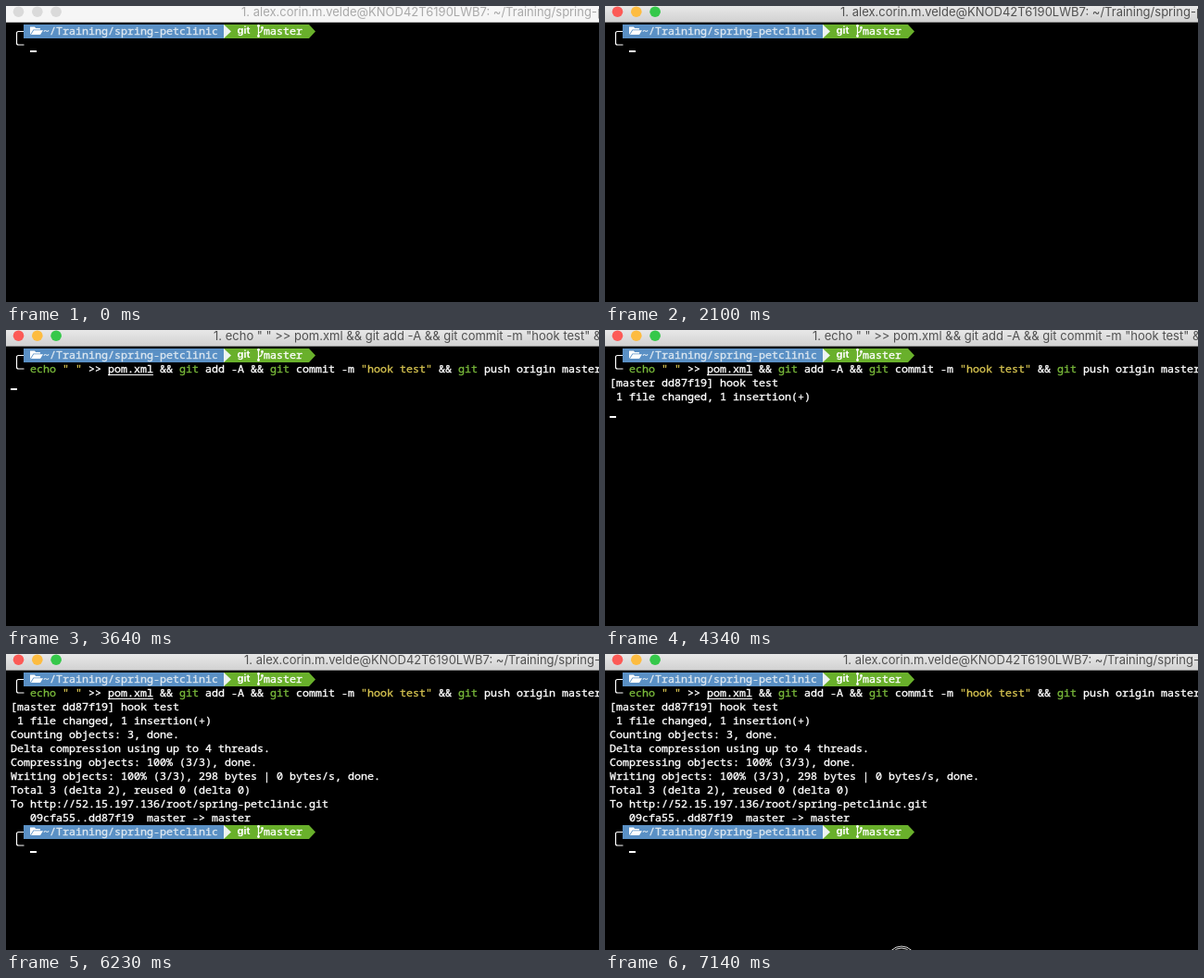
Recreate the animation shown at these times as an HTML page with a canvas. Size 640 px wide and 320 px high, loop 7210 ms.

```html
<!DOCTYPE html>
<html lang="en">
<head>
<meta charset="utf-8">
<title>Terminal push</title>
<style>
  html, body { margin: 0; height: 100%; overflow: hidden; background: #000; }
  canvas { display: block; }
</style>
</head>
<body>
<canvas id="stage" width="640" height="320"></canvas>
<script>
const ctx = document.getElementById('stage').getContext('2d');
const LOOP = 7210, STEP = 70;
const CELL = 7, LINE = 15, LEFT = 5, TOP = 20;
const WHITE = '#fff', GREEN = '#78b83a', YELLOW = '#d6c350';
const BLUE_BG = '#5a90c5', GREEN_BG = '#69b02b';

// Moments when the screen changes, in ms
const AT = {
  press: 1400, focus: 1610, release: 1750, paste: 2450, enter: 3570,
  commit: 3780, count: 4480, write: 4620, total: 4760,
  remote: 6090, prompt: 6230, stop: 7070
};

const command = [
  ['echo', GREEN], [' " "', YELLOW], [' >> pom.xml && ', WHITE],
  ['git', GREEN], [' add -A && ', WHITE], ['git', GREEN],
  [' commit -m ', WHITE], ['"hook test"', YELLOW], [' && ', WHITE],
  ['git', GREEN], [' push origin master', WHITE]
];
const commandText = command.map(part => part[0]).join('');

const output = [
  [AT.commit, '[master dd87f19] hook test'],
  [AT.commit, ' 1 file changed, 1 insertion(+)'],
  [AT.count, 'Counting objects: 3, done.'],
  [AT.count, 'Delta compression using up to 4 threads.'],
  [AT.write, 'Compressing objects: 100% (3/3), done.'],
  [AT.write, 'Writing objects: 100% (3/3), 298 bytes | 0 bytes/s, done.'],
  [AT.total, 'Total 3 (delta 2), reused 0 (delta 0)'],
  [AT.remote, 'To http://52.15.197.136/root/spring-petclinic.git'],
  [AT.remote, '   09cfa55..dd87f19  master -> master']
];

const colX = col => LEFT + col * CELL;
const rowY = row => TOP + row * LINE;

function rect(x, y, w, h, color) {
  ctx.fillStyle = color;
  ctx.fillRect(x, y, w, h);
}

function shape(d, color) {
  ctx.fillStyle = color;
  ctx.fill(new Path2D(d));
}

function line(d, color, width) {
  ctx.strokeStyle = color;
  ctx.lineWidth = width;
  ctx.stroke(new Path2D(d));
}

function circle(x, y, r) {
  ctx.beginPath();
  ctx.arc(x, y, r, 0, 2 * Math.PI);
}

// Monospaced text on the terminal grid, slightly thickened
function print(text, col, row, color = WHITE) {
  ctx.font = '11.667px "Noto Sans Mono", monospace';
  ctx.fillStyle = ctx.strokeStyle = color;
  ctx.lineWidth = 0.35;
  [...text].forEach((ch, i) => {
    ctx.fillText(ch, colX(col + i), rowY(row) + 11);
    ctx.strokeText(ch, colX(col + i), rowY(row) + 11);
  });
}

function caret(col, row) {
  rect(colX(col), rowY(row) + 13, CELL, 2, WHITE);
}

function prompt(row) {
  ctx.save();
  ctx.translate(0, row * LINE);
  line('M19 27.5H13.5Q11.5 27.5 11.5 29.5V40Q11.5 42 13.5 42H19.5', WHITE, 1.2);
  rect(19, 20, 217, 15, BLUE_BG);
  shape('M235 20H327L334 27.5L327 35H235Z', GREEN_BG);
  shape('M235 20L243 27.5L235 35Z', '#eef4f2');
  shape('M26 31V22.5H31L32 24H37V25.5H29.5Z', WHITE);
  shape('M30 26.3H40L37 31H27Z', WHITE);
  print('~/Training/spring-petclinic', 5, 0, '#dce7f0');
  ctx.font = 'bold 11px Inter, sans-serif';
  ctx.fillStyle = WHITE;
  ctx.fillText('git', 249.5, 30);
  line('M272.5 22V32.5M272.5 29Q276.5 28.5 276.5 24', WHITE, 1.2);
  for (const [x, y] of [[272.5, 21.5], [272.5, 32.5], [276.5, 23.5]]) {
    circle(x, y, 1.4);
    ctx.fill();
  }
  print('master', 39, 0);
  ctx.restore();
}

function titleBar(t) {
  const active = t >= AT.focus;
  const running = t >= AT.enter && t < AT.prompt;
  let bar = '#f6f6f6';
  if (active) {
    bar = ctx.createLinearGradient(0, 0, 0, 17);
    bar.addColorStop(0, '#e8e8e8');
    bar.addColorStop(1, '#d2d2d2');
  }
  rect(0, 0, 640, 17, bar);
  rect(0, 17, 640, 1, active ? '#8c8c8c' : '#b8b8b8');
  ['#fc5b57', '#fdbc40', '#35c84a'].forEach((color, i) => {
    circle(13.5 + i * 20.3, 6.2, 5.8);
    ctx.fillStyle = active ? color : '#dadada';
    ctx.fill();
  });
  ctx.font = '13px Inter, sans-serif';
  ctx.fillStyle = active ? '#505050' : '#a9a9a9';
  const shellTitle = '1. alex.corin.m.velde@KNOD42T6190LWB7: ~/Training/spring-petclinic';
  if (running) ctx.fillText('1. ' + commandText, 224, 11);
  else ctx.fillText(shellTitle, t >= AT.prompt ? 257 : 254, 11);
}

function clickRing(x, y) {
  ctx.strokeStyle = '#dedede';
  ctx.lineWidth = 1;
  for (const r of [15.5, 13.5]) {
    circle(x, y, r);
    ctx.stroke();
  }
  ctx.save();
  ctx.translate(x, y);
  line('M-3.5 -8Q-.5 -8 -.5 -5V5Q-.5 8 -3.5 8M2.5 -8Q-.5 -8 -.5 -5M-.5 5Q-.5 8 2.5 8M-2.5 2H1.5', WHITE, 1.2);
  ctx.restore();
}

function draw(t) {
  rect(0, 0, 640, 320, '#000');
  titleBar(t);
  prompt(0);

  if (t >= AT.paste) {
    let col = 3;
    for (const [text, color] of command) {
      print(text, col, 1, color);
      col += text.length;
    }
    rect(colX(15), rowY(1) + 13, 7 * CELL, 1, WHITE);
  }

  const shown = output.filter(([time]) => t >= time);
  shown.forEach(([, text], i) => print(text, 0, i + 2));

  if (t < AT.paste) {
    caret(3, 1);
  } else if (t >= AT.prompt) {
    prompt(11);
    caret(3, 12);
  } else if (t >= AT.enter) {
    caret(0, shown.length + 2);
  }

  if (t >= AT.press && t < AT.release) clickRing(370.5, 207);
  if (t >= AT.stop) clickRing(320, 331.5);
}

function frame(now) {
  const t = now % LOOP;
  draw(t - t % STEP);
  requestAnimationFrame(frame);
}
requestAnimationFrame(frame);
</script>
</body>
</html>
```
